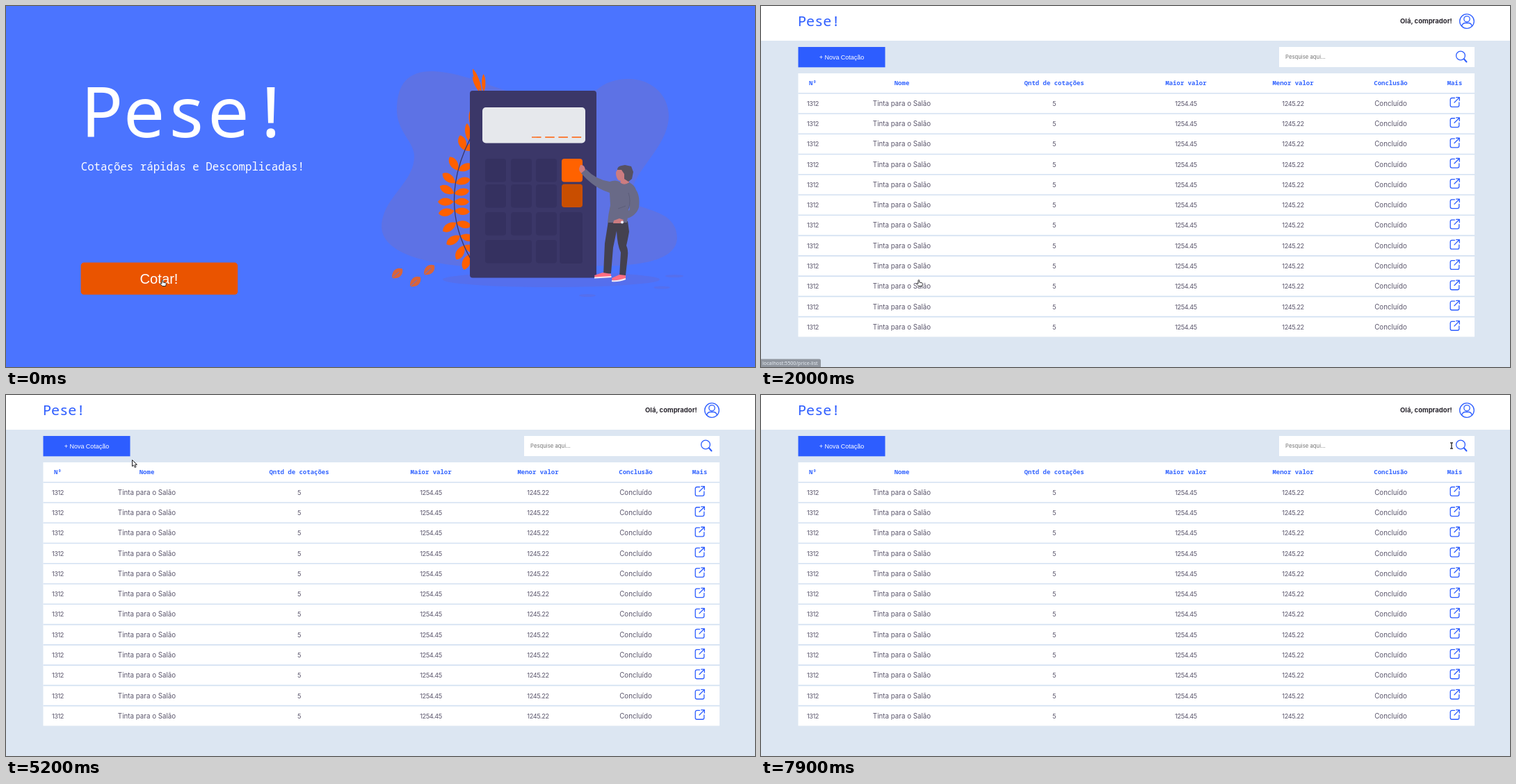
An HTML page for the animation above (8 s loop, 1077x520 px).

```html
<!DOCTYPE html>
<html lang="pt">
<head>
<meta charset="utf-8">
<title>Pese!</title>
<style>
html, body { margin: 0; width: 100%; height: 100%; overflow: hidden; background: #4b74ff; }
svg { display: block; width: 100vw; height: 100vh; }
.mono { font-family: "Fira Code", "Noto Sans Mono", monospace; }
.arial { font-family: "Liberation Sans", Arial, sans-serif; fill: #fff; }
.text { font: 9.75px Poppins, Inter, sans-serif; fill: #5b566c; }
.num { font-size: 9.2px; letter-spacing: -.4px; }
.mid { text-anchor: middle; }
.line { fill: none; stroke: #2d5dff; stroke-width: 1.3; stroke-linecap: round; stroke-linejoin: round; }
</style>
</head>
<body>
<svg viewBox="0 0 1077 520">
  <defs>
    <path id="arrow" d="M.5 .6V9.8L2.7 7.9 4.3 11.4 6 10.6 4.5 7.3H7.4Z" fill="#fff" stroke="#1c1c20" stroke-linejoin="round"/>
    <path id="hand" d="M3 6V1.5a.9.9 0 0 1 1.8 0V4L8.4 4.8Q9.5 5.2 9.3 6.4L8.6 9.5H3.9L.8 6.3Q.8 5 2 5.3Z" fill="#fff" stroke="#1c1c20" stroke-width=".9" stroke-linejoin="round"/>
    <g id="beam" fill="none">
      <path d="M.5 .8H4.5M2.5 .8V9.2M.5 9.2H4.5" stroke="#fff" stroke-width="2.4"/>
      <path d="M.5 .8H4.5M2.5 .8V9.2M.5 9.2H4.5" stroke="#222" stroke-width="1.3"/>
    </g>
    <g id="open" class="line">
      <path d="M7 1.5H3Q.7 1.5 .7 4V12Q.7 14.3 3 14.3H11Q13.3 14.3 13.3 12V8M9.2 .7H13.8V5.2M13.6 .9 6.5 8"/>
    </g>
  </defs>

  <g id="home">
    <rect width="1077" height="520" fill="#4b74ff"/>
    <g fill="#fff" class="mono">
      <text x="108" y="189" font-size="101">Pese!</text>
      <text x="107.700" y="237" font-size="15.750">Cotações rápidas e Descomplicadas!</text>
    </g>
    <rect x="107.600" y="369.600" width="225.600" height="46.200" rx="4.500" fill="#ea5400"/>
    <text class="arial mid" x="220" y="399.700" font-size="20.200">Cotar!</text>

    <path fill="#5d72e5" d="M562 150C562 110 580 93 615 94C665 97 700 120 750 130L849 121C862 110 877 105 895 105C930 105 953 130 953 158C953 195 918 224 904 254Q896 274 908 287C930 296 965 300 965 335C963 370 900 376 840 374C770 374 720 382 660 375C600 370 541 355 540 318C541 275 588 255 587 215C586 195 562 180 562 150Z"/>
    <g fill="#556fed">
      <ellipse cx="784" cy="394" rx="156" ry="11"/>
      <ellipse cx="961" cy="389" rx="13" ry="2"/>
      <ellipse cx="943" cy="405.500" rx="12" ry="2"/>
      <ellipse cx="836" cy="417" rx="12" ry="2"/>
    </g>
    <g id="plant" fill="#ff6000"></g>
    <path d="M668 364Q621 282 668 190" fill="none" stroke="#3b3768" stroke-width="1.300"/>
    <g id="fallen"></g>

    <rect x="667" y="122" width="182" height="269.500" rx="4" fill="#3b3768"/>
    <rect x="685" y="146" width="148" height="51.500" rx="5" fill="#e6e8ec"/>
    <path d="M756 189H827.500" stroke="#f9803e" stroke-width="1.800" stroke-dasharray="13.500 5.700"/>
    <g id="keys" fill="#353160"></g>

    <g>
      <path fill="#cc7c80" d="M826 229Q832 228 833 236L830 242Q824 240 824 234ZM885 246H896V257Q890 261 883 256Z"/>
      <path fill="#44414f" d="M866 310H894L896 325Q894 337 892 345Q895 352 894 360L891 388 882 390 884 355Q879 345 878 324L873 348 870 385 859 387 861 342Z"/>
      <path fill="#696a87" d="M827 241 834 235Q848 250 868 253Q876 250 882 253 888 260 896 254 904 258 906 265 912 273 910 290 906 303 890 307L887 304 897 293 896 286 893 312H865Q866 300 869 287L868 269Q845 262 827 241Z"/>
      <path fill="none" stroke="#5c5d79" d="M895 269Q899 281 895 292M880 292 891 288"/>
      <path fill="#cc7c80" d="M877 242Q877 234 885 234L894 238 892 249 886 252Q878 253 877 242ZM874 309 882 306 888 308 886 313H873Z"/>
      <path fill="#565161" d="M879 236Q879 231 885 230L890 229 899 231 902 239 900 249 895 253 889 249 889 242 885 236Z"/>
      <circle cx="886" cy="311.500" r="2" fill="#eef"/>
      <path fill="#ff6d83" d="M846 388 858 384 870 386V391L847 392ZM871 392 882 387 891 388V393L872 396Z"/>
      <path fill="none" stroke="#f2eaf5" stroke-width="2" d="M846 391.500 870.500 390M871 396Q880 397 891 393"/>
    </g>
  </g>

  <g id="list">
    <rect width="1077" height="520" fill="#dce6f2"/>
    <rect width="1077" height="50" fill="#fff"/>
    <text class="mono" x="53" y="28.500" font-size="20.200" fill="#2d5dff">Pese!</text>
    <text class="text" x="919" y="25.300" style="font-size:9.5px;font-weight:700;fill:#29262e">Olá, comprador!</text>
    <g class="line">
      <circle cx="1015" cy="22" r="10.300"/>
      <circle cx="1015" cy="18.800" r="4.200"/>
      <path d="M1007.500 29Q1009 24.500 1012.500 24.500H1017.500Q1021 24.500 1022.500 29"/>
    </g>
    <rect id="newQuote" x="53.500" y="59" width="125" height="29.300"/>
    <text class="arial mid" x="116" y="76.600" font-size="8.980">+ Nova Cotação</text>
    <rect x="745" y="59" width="281" height="29" fill="#fff"/>
    <text class="text" x="754" y="75.800" style="font-size:7.75px;fill:#757575">Pesquise aqui...</text>
    <g class="line"><circle cx="1006" cy="71.500" r="6.400"/><path stroke-width="2" d="M1011 76.500 1014.500 80.500"/></g>
    <path id="caret" d="M754.500 68V79" stroke="#333" stroke-width=".8"/>
    <rect x="53.500" y="97" width="972.500" height="379.500" fill="#fff"/>
    <g id="table"></g>
  </g>

  <g id="status">
    <path d="M0 508.500H84Q86 508.500 86 510.500V520H0Z" fill="#292a2f"/>
    <text x="2" y="517" font-size="7.150" font-family="Noto Sans, Open Sans, sans-serif" fill="#eee">localhost:5500/price-list</text>
  </g>
  <use id="cursor"/>
</svg>
<script>
const $ = id => document.getElementById(id);
const add = (id, html) => $(id).insertAdjacentHTML('beforeend', html);

// Plant: leaf pairs along a bent stem
const leaf = (x, y, angle, len, w) =>
  `<path transform="translate(${x} ${y}) rotate(${angle})" d="M0 0C${len * .3} ${-w} ${len * .8} ${-w} ${len} 0C${len * .8} ${w} ${len * .3} ${w} 0 0Z"/>`;
const pairs = [[208, -108], [237, -121], [255, -143], [270, -153], [282, 180], [295, 170], [312, 147], [331, 148], [345, 119], [358, 108]];
for (const [y, angle] of pairs) {
  const x = 644 + (y - 282) ** 2 * (y < 282 ? .0029 : .0037);
  const right = Math.sign(angle) * (180 - Math.abs(angle)) / 2.5;
  add('plant', leaf(x, y, angle, 23, 7.5) + leaf(x, y, right, 22, 7));
}
add('plant', leaf(665, 194, -95, 25, 5) + leaf(669, 174, -92, 25, 4));
add('plant', leaf(684, 124, -111, 36, 4) + leaf(687, 124, -91, 26, 3.5) + leaf(681, 124, -114, 25, 3));
for (const [x, y] of [[555, 392], [581, 404], [601, 387]])
  add('fallen', `<g fill="#d9643a">${leaf(x, y, -42, 20, 8)}</g><path d="M${x} ${y}l10 -9" stroke="#5470ee"/>`);

// Calculator keys
const key = (x, y, w = 30, h = 33.5, fill = '') =>
  add('keys', `<rect x="${x}" y="${y}" width="${w}" height="${h}" rx="4" ${fill && `fill="${fill}"`}/>`);
for (const y of [220, 257, 297]) for (const x of [689, 726, 762]) key(x, y);
key(689, 337, 67);
key(762, 337);
key(796, 297, 33, 74);
key(799, 220, 30, 33.5, '#ff6200');
key(799, 256.5, 30, 33.5, '#c94e00');

// Price table
const columns = [
  [74.5, 'Nº', '1312'], [202.5, 'Nome', 'Tinta para o Salão'], [421.5, 'Qntd de cotações', '5'],
  [611, 'Maior valor', '1254.45'], [765, 'Menor valor', '1245.22'], [905.5, 'Conclusão', 'Concluído'], [997.5, 'Mais', '']
];
const pitch = 29.27;
for (const [x, head] of columns)
  add('table', `<text class="mono mid" x="${x}" y="114" font-size="8.98" font-weight="700" fill="#3566ff">${head}</text>`);
for (let i = 0; i < 12; i++) {
  const y = i * pitch;
  add('table', `<path d="M53.5 ${125.7 + y}H1026" stroke="#d3e1f2" stroke-width="1.6"/><use href="#open" x="990.5" y="${131 + y}"/>`);
  for (const [x, , cell] of columns)
    add('table', `<text class="text mid ${/^\d/.test(cell) ? 'num' : ''}" x="${x}" y="${143.8 + y}">${cell}</text>`);
}

// Pointer steps: start time, then shape and top left corner
const steps = [
  [0, 'hand', 221, 394], [500, 'hand', 222, 394], [600, 'hand', 223, 394], [1500, 'arrow', 224, 395],
  [2000, 'hand', 223, 394], [3300, 'arrow', 151, 277], [3500, 'arrow', 137, 205], [3600, 'arrow', 124, 148],
  [3800, 'arrow', 119, 118], [4000, 'arrow', 125, 90], [4200, 'hand', 128, 75], [4500, 'hand', 129, 74],
  [4700, 'hand', 132, 77], [4800, 'hand', 138, 80], [5000, 'hand', 147, 81], [5200, 'arrow', 181, 93],
  [5400, 'arrow', 206, 94], [5600, 'arrow', 271, 98], [5900, 'arrow', 474, 74], [6100, 'arrow', 640, 77],
  [6300, 'arrow', 691, 77], [6500, 'beam', 756, 70], [6700, 'beam', 766, 69], [7200, 'beam', 804, 72],
  [7400, 'beam', 834, 74], [7500, 'beam', 874, 74], [7600, 'beam', 914, 73], [7700, 'beam', 949, 71],
  [7800, 'beam', 975, 69], [7900, 'beam', 990.5, 68]
];
const show = (id, on) => $(id).style.display = on ? '' : 'none';
const start = performance.now();

function draw() {
  const t = (performance.now() - start) % 8000;
  const [, shape, x, y] = steps.findLast(s => s[0] <= t) || steps[0];
  show('home', t < 2000);
  show('list', t >= 2000);
  show('status', t >= 300 && t < 2100);
  $('status').setAttribute('opacity', t < 2000 ? 1 : .42);
  $('newQuote').setAttribute('fill', t >= 4200 && t < 5200 ? '#2450e0' : '#2d5dff');
  show('caret', t >= 7200 && t < 7700);
  $('cursor').setAttribute('href', '#' + shape);
  $('cursor').setAttribute('transform', `translate(${x} ${y})`);
  requestAnimationFrame(draw);
}
draw();
</script>
</body>
</html>
```
